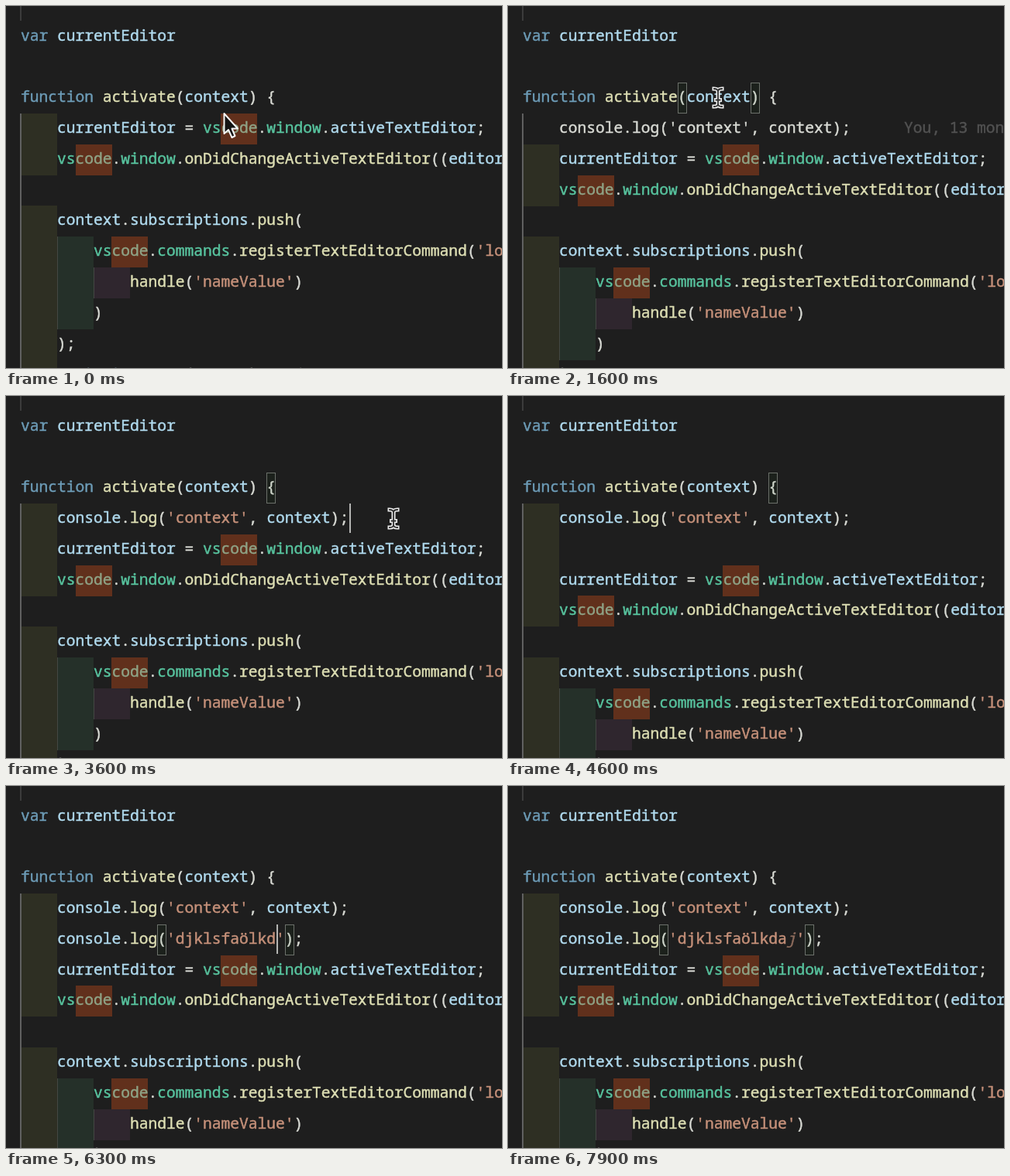
An HTML page for the animation above (8000 ms loop, 640 by 468 pixels).

```html
<!DOCTYPE html>
<html lang="en">
<head>
<meta charset="utf-8">
<title>Log shortcut in a code editor</title>
<style>
  html, body { margin: 0; width: 100%; height: 100%; overflow: hidden; background: #1e1e1e; }
  #stage {
    --row: 39.8px; --top: 19.6px; --left: 19px; --shift: 0;
    position: relative; width: 640px; height: 468px; overflow: hidden;
    background: #1e1e1e; color: #d9dbd5;
    font: 500 19.583px "Noto Sans Mono", "Liberation Mono", monospace;
    font-variant-ligatures: none;
    -webkit-text-stroke-width: .45px;
  }
  #stage > *, .line { position: absolute; }
  .line {
    left: var(--left); top: round(calc(var(--top) + (var(--r) + var(--shift)) * var(--row)), 1px);
    width: 900px; height: 40px; line-height: 35px; white-space: pre;
  }
  #body { left: 0; top: 0; }
  i { font-style: normal; }
  .k { color: #6d9cb7; }
  .v { color: #b0daee; }
  .f { color: #dedfb4; }
  .t { color: #58c49f; }
  .s { color: #c6917a; }
  .h { display: inline-block; height: 40px; vertical-align: top; background: #61301c; color: #8fa386; }

  /* coloured indent levels */
  .d1 { background: linear-gradient(90deg, #2e2f23 47px, transparent 0); }
  .d2 { background: linear-gradient(90deg, #2e2f23 47px, #444743 0 48px, #253029 0 94px, transparent 0); }
  .d3 { background: linear-gradient(90deg, #2e2f23 47px, #444743 0 48px, #253029 0 94px, #444743 0 95px, #2f262e 0 141px, transparent 0); }
  .guide { left: 18px; width: 2px; }

  .plain i { color: inherit; }
  #blame { left: 511px; width: 200px; color: #525252; }
  #ghost { font-style: italic; color: #8d6c5d; }
  .pair {
    box-sizing: border-box; width: 12px; height: 40px;
    border: 1px solid #6c716b; background: rgba(0, 100, 0, .05);
  }
  #caret { width: 2px; height: 38px; background: #b4b5b3; }
  #mouse { left: 0; top: 0; overflow: visible; }
</style>
</head>
<body>
<div id="stage">
  <div class="line" style="--r:0"><i class="k">var</i> <i class="v">currentEditor</i></div>
  <div class="line" style="--r:2"><i class="k">function</i> <i class="f">activate</i>(<i class="v">context</i>) {</div>
  <div class="line" id="log1" style="--r:3">    <i class="v">console</i>.<i class="f">log</i>(<i class="s">'context'</i>, <i class="v">context</i>);</div>
  <div class="line" id="blame" style="--r:3">You, 13 months ago</div>
  <div class="line d1" id="blank" style="--r:4"><span id="log2">    <i class="v">console</i>.<i class="f">log</i>(<i class="s">'<i id="typed"></i><i id="ghost">j</i>'</i>);</span></div>

  <div id="body">
    <div class="line d1" style="--r:3">    <i class="v">currentEditor</i> = <i class="t">vs<i class="h">code</i></i>.<i class="t">window</i>.<i class="v">activeTextEditor</i>;</div>
    <div class="line d1" style="--r:4">    <i class="t">vs<i class="h">code</i></i>.<i class="t">window</i>.<i class="f">onDidChangeActiveTextEditor</i>((<i class="v">editor</i>) =&gt; {</div>
    <div class="line d1" style="--r:6">    <i class="v">context</i>.<i class="v">subscriptions</i>.<i class="f">push</i>(</div>
    <div class="line d2" style="--r:7">        <i class="t">vs<i class="h">code</i></i>.<i class="t">commands</i>.<i class="f">registerTextEditorCommand</i>(<i class="s">'log'</i>,</div>
    <div class="line d3" style="--r:8">            <i class="f">handle</i>(<i class="s">'nameValue'</i>)</div>
    <div class="line d2" style="--r:9">        )</div>
    <div class="line d1" style="--r:10">    );</div>
    <div class="line d1" style="--r:11">    <i class="v">context</i>.<i class="f">groups</i>(<i class="v">source</i>) =&gt; {</div>
  </div>

  <div class="guide" style="top:0;height:19px;background:#3b3b3b"></div>
  <div class="guide" style="top:139px;height:329px;background:#606060"></div>
  <div class="pair"></div>
  <div class="pair"></div>
  <div id="caret"></div>

  <svg id="mouse" width="1" height="1">
    <path id="arrow" d="M0 0V26L5.500 21L10 31L14 29L10 19.500H17.500Z" fill="#141414" stroke="#f4f4f4" stroke-width="2" stroke-linejoin="round"/>
    <g id="beam" fill="none" stroke-linecap="square">
      <path id="shape" d="M-5-11.500Q0-11.500 0-8Q0-11.500 5-11.500M0-8V8M-5 11.500Q0 11.500 0 8Q0 11.500 5 11.500M-2.500 3H2.500"/>
      <use href="#shape" stroke="#ededed" stroke-width="5"/>
      <use href="#shape" stroke="#303030" stroke-width="1.8"/>
    </g>
  </svg>
</div>

<script>
  const LOOP = 8000, STEP = 100, ROW = 39.8, TOP = 19.6, COL = 11.75, LEFT = 19;
  const CLICK = 1100, LOG = 1500, COLOUR = 1800, BLAME_END = 2000;
  const CLICK2 = 3400, ENTER = 4100, LOG2 = 5000, TYPE = 6000, LAST = 6500;
  const WORD = 'djklsfaölkda';

  const $ = id => document.getElementById(id);
  const pairs = document.querySelectorAll('.pair');
  const show = (el, on) => { el.style.visibility = on ? 'visible' : 'hidden'; };
  const place = (el, col, row, dx = 0) => {
    el.style.left = Math.round(LEFT + col * COL) + dx + 'px';
    el.style.top = Math.round(TOP + row * ROW) + 'px';
  };
  const ease = (t, from, to) => {
    const p = Math.min(1, Math.max(0, (t - from) / (to - from)));
    return p * p * (3 - 2 * p);
  };

  function typedCount(t) {
    if (t < TYPE) return 0;
    return Math.min(WORD.length, 2 + 3 * (t - TYPE) / STEP);
  }

  function drawMarks(t, n) {
    let marks = [], caret = null, since = 0;
    if (t >= LOG2) {
      marks = [[15, 4], [18 + n, 4]];
      caret = [17 + n, 4];
      since = t < TYPE ? LOG2 : t < LAST ? t : LAST - STEP;
    } else if (t >= CLICK2) {
      marks = [[27, 2]];
      caret = t < ENTER ? [36, 3] : [4, 4];
      since = t < ENTER ? CLICK2 : ENTER;
    } else if (t >= CLICK) {
      marks = [[17, 2], [25, 2]];
      caret = [21, 2];
      since = CLICK;
    }
    pairs.forEach((el, i) => {
      show(el, i < marks.length);
      if (marks[i]) place(el, ...marks[i]);
    });
    show($('caret'), caret && (t - since) % 1000 < 500);
    if (caret) place($('caret'), ...caret, 1);
  }

  function drawMouse(t) {
    const a = ease(t, 0, 600), b = ease(t, 2500, 3300);
    const x = 281.5 - 10.5 * a + 229 * b, y = 139 - 20.5 * a + 40 * b;
    const arrow = t < 200;
    $('mouse').style.transform = `translate(${x}px, ${y}px)`;
    show($('arrow'), arrow);
    show($('beam'), !arrow && t < ENTER);
  }

  function draw(t) {
    const n = typedCount(t), ghost = t >= LAST;
    $('body').style.setProperty('--shift', (t >= LOG) + (t >= ENTER));
    show($('log1'), t >= LOG);
    $('log1').className = 'line ' + (t < COLOUR ? 'plain' : 'd1');
    show($('blame'), t >= LOG && t < BLAME_END);
    show($('blank'), t >= ENTER);
    show($('log2'), t >= LOG2);
    $('typed').textContent = WORD.slice(0, n);
    $('ghost').style.display = ghost ? 'inline' : 'none';
    drawMarks(t, n + ghost);
    drawMouse(t);
  }

  const start = performance.now();
  function tick() {
    const t = (performance.now() - start) % LOOP;
    draw(Math.floor(t / STEP) * STEP);
    requestAnimationFrame(tick);
  }
  tick();
</script>
</body>
</html>
```
